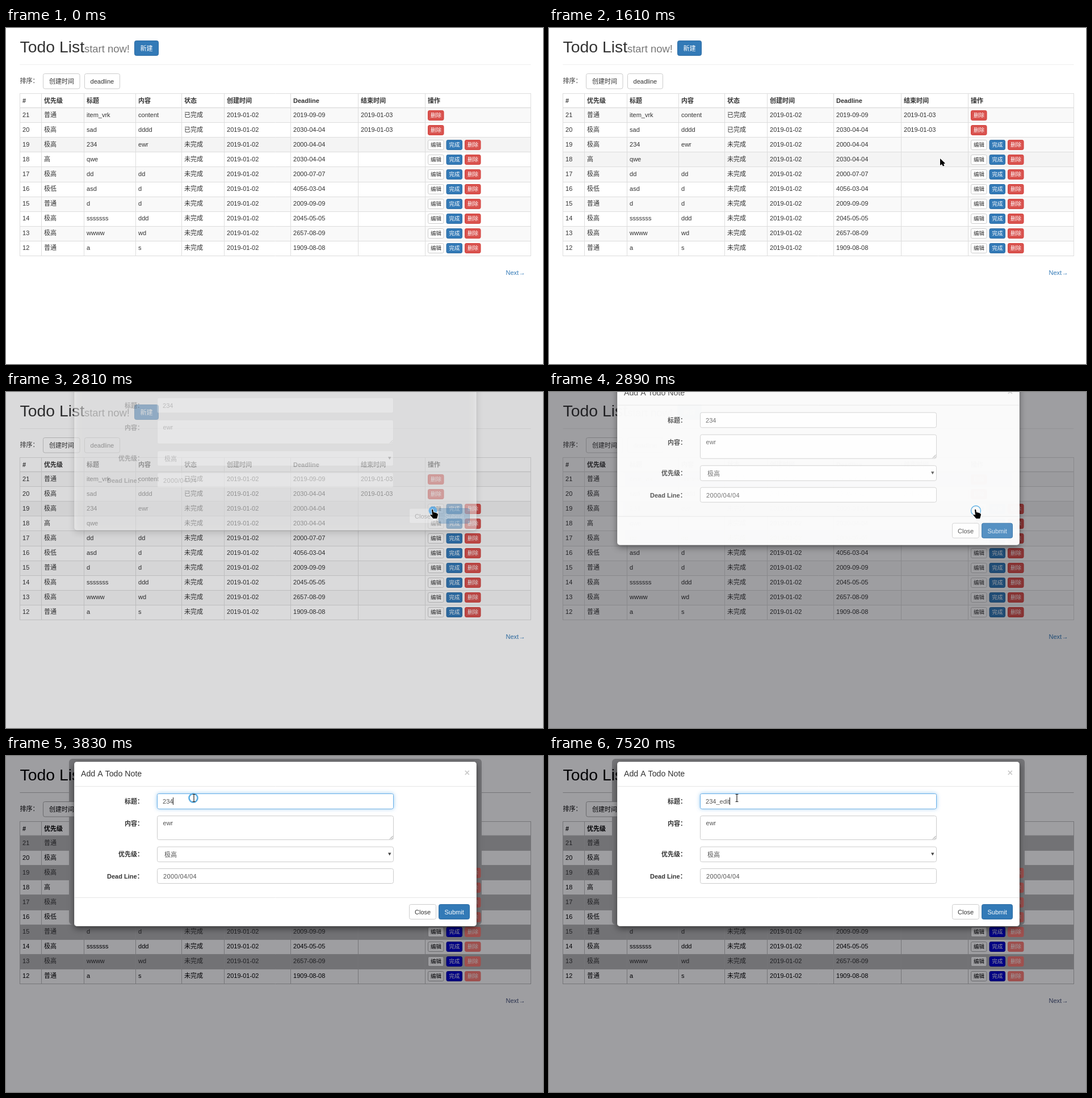
Recreate the animation shown at these times as an HTML page with a canvas. Size 946 px wide and 592 px high, loop 8000 ms.

```html
<!DOCTYPE html>
<html lang="zh">
<head>
<meta charset="utf-8">
<title>Todo List</title>
<style>
html, body { margin: 0; width: 100%; height: 100%; overflow: hidden; background: #fff; }
canvas { display: block; }
</style>
</head>
<body>
<canvas id="stage" width="946" height="592"></canvas>
<script>
const ctx = document.getElementById('stage').getContext('2d');
const LOOP = 8000, OPEN = 2768, CLICKS = [[2640, 752, 209], [3600, 330, 74]];
const FAMILY = '"Liberation Sans", Arial, "Noto Sans CJK SC", sans-serif';
const COLS = [24.5, 62.5, 137.5, 228.5, 309.5, 384.5, 501.5, 620.5, 738.5, 924.5];
const HEAD = ['#', '优先级', '标题', '内容', '状态', '创建时间', 'Deadline', '结束时间', '操作'];
const ROWS = [
  '普通|item_vrk|content|2019-09-09', '极高|sad|dddd|2030-04-04',
  '极高|234|ewr|2000-04-04', '高|qwe||2030-04-04', '极高|dd|dd|2000-07-07',
  '极低|asd|d|4056-03-04', '普通|d|d|2009-09-09', '极高|sssssss|ddd|2045-05-05',
  '极高|wwww|wd|2657-08-09', '普通|a|s|1909-08-08'
].map((row, i) => {
  const [level, title, body, due] = row.split('|'), done = i < 2;
  return [21 - i, level, title, body, done ? '已完成' : '未完成', '2019-01-02', due, done ? '2019-01-03' : ''];
});
// time, x, y of the pointer's hot spot
const PATH = [
  [350, 93, 203], [1150, 590, 213], [1610, 689, 230], [1790, 689, 230], [2480, 750, 207],
  [2950, 750, 207], [3370, 362, 98], [3590, 331, 74], [LOOP, 331, 74]
];
const TYPED = [[5780, '_'], [6830, 'e'], [7120, 'd'], [7350, 'i'], [7520, 't']];

const clamp = v => Math.max(0, Math.min(1, v));
const rowY = i => 140.5 + Math.round(26.1 * i);

function easeOut(x) {
  let lo = 0, hi = 1;
  for (let i = 0; i < 20; i++) {
    const s = (lo + hi) / 2;
    if (1.74 * (1 - s) * s * s + s ** 3 < x) lo = s; else hi = s;
  }
  return 3 * lo * lo - 2 * lo ** 3;
}

function text(str, x, y, color = '#333', size = 11.03, weight = '') {
  ctx.font = `${weight} ${size}px ${FAMILY}`;
  ctx.fillStyle = color;
  ctx.fillText(str, x, y);
}

function line(x1, y1, x2, y2, color, width = 1) {
  ctx.strokeStyle = color;
  ctx.lineWidth = width;
  ctx.beginPath();
  ctx.moveTo(x1, y1);
  ctx.lineTo(x2, y2);
  ctx.stroke();
}

function box(x, y, w, h, fill, stroke, r = 3) {
  ctx.beginPath();
  ctx.roundRect(x, y, w, h, r);
  ctx.fillStyle = fill;
  ctx.fill();
  if (!stroke) return;
  ctx.lineWidth = 1;
  ctx.strokeStyle = stroke;
  ctx.stroke();
}

function shape(points, x, y) {
  ctx.beginPath();
  points.forEach(([px, py]) => ctx.lineTo(x + px, y + py));
  ctx.closePath();
  ctx.lineJoin = 'round';
  ctx.lineWidth = 1.6;
  ctx.strokeStyle = '#fff';
  ctx.stroke();
  ctx.fillStyle = '#000';
  ctx.fill();
}

function pointer(t) {
  if (t < PATH[0][0]) return null;
  const i = PATH.findIndex(p => t < p[0]), a = PATH[i - 1], b = PATH[i];
  const u = (t - a[0]) / (b[0] - a[0]), s = u * u * (3 - 2 * u);
  return [a[1] + (b[1] - a[1]) * s, a[2] + (b[2] - a[2]) * s];
}

function page(hover, editHover, dark) {
  const ink = dark ? '#000' : '#333', edge = dark ? '#bdbdbd' : '#ddd';
  const blue = dark ? '#0000cf' : '#337ab7', red = dark ? '#ff8078' : '#d9534f';
  ctx.fillStyle = '#fff';
  ctx.fillRect(0, 0, 946, 592);

  ROWS.forEach((row, i) => {
    const stripe = dark ? '#b8b8b8' : '#f9f9f9';
    ctx.fillStyle = !dark && i === hover ? '#f4f4f4' : i % 2 ? '#fff' : stripe;
    ctx.fillRect(24.5, rowY(i), 900, rowY(i + 1) - rowY(i));
  });
  line(24.5, 64.5, 924.5, 64.5, dark ? '#bdbdbd' : '#eee');
  line(24.5, 115.5, 924.5, 115.5, edge);
  line(24.5, 140.5, 924.5, 140.5, edge, 1.6);
  for (let i = 1; i <= 10; i++) line(24.5, rowY(i), 924.5, rowY(i), edge);
  COLS.forEach(x => line(x, 115, x, 402, edge));
  if (dark) box(111, 5, 727, 292, '#bcbcbc', null, 6);

  text('Todo List', 24.5, 43, ink, 28.4);
  text('start now!', 138, 43, '#777', 18.45);
  box(226.5, 22.5, 42, 26, blue, dark ? blue : '#2e6da4');
  text('新建', 236.5, 40, '#fff');
  text('排序：', 24.5, 97, ink);
  box(65.5, 80.5, 64.5, 26.5, '#fff', dark ? '#aaa' : '#ccc');
  text('创建时间', 76, 98, ink);
  box(138.5, 80.5, 62, 26.5, '#fff', '#ccc');
  text('deadline', 148.5, 98, ink);
  text('Next→', 880.5, 435, dark ? '#445078' : '#337ab7');

  HEAD.forEach((label, c) => text(label, COLS[c] + 4.5, 132, ink, 11.03, 'bold'));
  ROWS.forEach((row, i) => {
    row.forEach((cell, c) => text(cell, COLS[c] + 4.5, 157 + 26 * i, i % 2 ? ink : '#333'));
    const y = 145.5 + 26 * i;
    const button = (label, x, fill, stroke, color) => {
      box(x, y, 27.5, 17, fill, stroke, 2.4);
      text(label, x + 4.5, y + 11.5, color, 9.46);
    };
    if (i < 2) return button('删除', 743.5, red, dark ? red : '#d43f3a', '#fff');
    const active = editHover && i === 2;
    button('编辑', 743.5, active ? '#e6e6e6' : '#fff', active || dark ? '#adadad' : '#ccc', ink);
    button('完成', 776, blue, dark ? '#0000a0' : '#2e6da4', '#fff');
    button('删除', 808.5, red, dark ? red : '#d43f3a', '#fff');
  });
}

function modal(t, fade) {
  const field = '#555', edge = '#ccc';
  ctx.save();
  ctx.globalAlpha = fade;
  ctx.translate(0, -72.6 * (1 - easeOut(clamp((t - OPEN) / 300))));
  ctx.save();
  ctx.shadowColor = 'rgba(0,0,0,.5)';
  ctx.shadowBlur = 12;
  ctx.shadowOffsetY = 4;
  box(120, 10, 709, 290, '#fff', null, 5);
  ctx.restore();
  box(120, 10, 709, 290, '#fff', 'rgba(0,0,0,.2)', 5);

  text('Add A Todo Note', 132, 36, '#333', 14.2);
  text('×', 807.5, 35, '#ccc', 16.5, 'bold');
  line(120, 53.5, 829, 53.5, '#e5e5e5');
  line(120, 249.5, 829, 249.5, '#e5e5e5');

  [['标题：', 209, 84], ['内容：', 209, 123], ['优先级：', 198, 177], ['Dead Line：', 178, 216]]
    .forEach(([label, x, y]) => text(label, x, y, '#333', 11.03, 'bold'));
  [[66.5, 26.5], [105.5, 42], [160, 26.5], [198.5, 26]]
    .forEach(([y, h]) => box(266.5, y, 416, h, '#fff', edge));

  const focus = clamp((t - 3600) / 150);
  if (focus) {
    ctx.save();
    ctx.globalAlpha = focus;
    ctx.shadowColor = 'rgba(102,175,233,.6)';
    ctx.shadowBlur = 6;
    box(266.5, 66.5, 416, 26.5, '#fff', '#66afe9');
    ctx.restore();
    box(267, 67, 415, 25.5, '#fff', null, 2.5);
  }
  const value = '234' + TYPED.filter(k => t >= k[0]).map(k => k[1]).join('');
  text(value, 276, 84, field);
  const caretOn = t >= 3600 && t < 4180 || t >= 4790 && t < 5370 || t >= 5780 && t < 6380 || t >= 6830;
  if (caretOn) {
    ctx.fillStyle = '#222';
    ctx.fillRect(Math.round(276 + ctx.measureText(value).width), 73, 1, 13);
  }
  text('ewr', 276.5, 122, field);
  line(676, 146.5, 681.5, 141, '#888');
  line(679, 146.5, 681.5, 144, '#888');
  text('极高', 279, 178, field);
  ctx.fillStyle = '#444';
  ctx.beginPath();
  ctx.moveTo(673, 170.5);
  ctx.lineTo(678.5, 170.5);
  ctx.lineTo(675.75, 175.5);
  ctx.fill();
  ctx.letterSpacing = '0.4px';
  text('2000/04/04', 277, 216, field);
  ctx.letterSpacing = '0px';

  box(710.5, 261.5, 47, 26, '#fff', edge);
  text('Close', 720, 279);
  box(762.5, 261.5, 54, 26, '#337ab7', '#2e6da4');
  text('Submit', 772.5, 279, '#fff');
  ctx.restore();
}

function clickMark(t) {
  for (const [start, x, y] of CLICKS) {
    const age = t - start;
    if (age < 0 || age > 350) continue;
    ctx.beginPath();
    ctx.arc(x, y, age < 235 ? 7.5 : 8.5, 0, 7);
    if (age < 200) {
      ctx.fillStyle = 'rgba(75,165,235,.75)';
      ctx.fill();
    } else {
      ctx.strokeStyle = '#5aaee4';
      ctx.lineWidth = age < 235 ? 2.6 : 1.3;
      ctx.stroke();
    }
  }
}

function cursor(t, [x, y]) {
  if (t >= 3300) {
    line(x, y - 6, x, y + 6, '#222', 1.2);
    line(x - 2.5, y - 6.5, x + 2.5, y - 6.5, '#222');
    line(x - 2.5, y + 6.5, x + 2.5, y + 6.5, '#222');
  } else if (t >= 2400 && t < 2990) {
    shape([[0, 0], [2, 0], [3, 5], [6, 5.5], [10, 7], [11, 9], [10, 13], [9, 16],
      [2.5, 16], [0, 13], [-2.5, 10], [-2, 8.5], [1, 10]], x, y);
  } else {
    shape([[0, 0], [0, 12], [3, 10], [5, 13.5], [7.5, 12.5], [6, 9.5], [9, 8.5]], x, y);
  }
}

function draw() {
  const t = performance.now() % LOOP, at = pointer(t);
  const fade = clamp((t - OPEN) / 150);
  const hover = at && at[1] > 218.5 && t < OPEN ? 3 : 2;
  page(hover, t >= 2400 && t < OPEN, fade === 1);
  if (fade) {
    ctx.fillStyle = `rgba(2,0,8,${Math.min(0.38, fade / 2)})`;
    ctx.fillRect(0, 0, 946, 592);
    modal(t, fade);
  }
  clickMark(t);
  if (at) cursor(t, at);
  requestAnimationFrame(draw);
}
draw();
</script>
</body>
</html>
```
